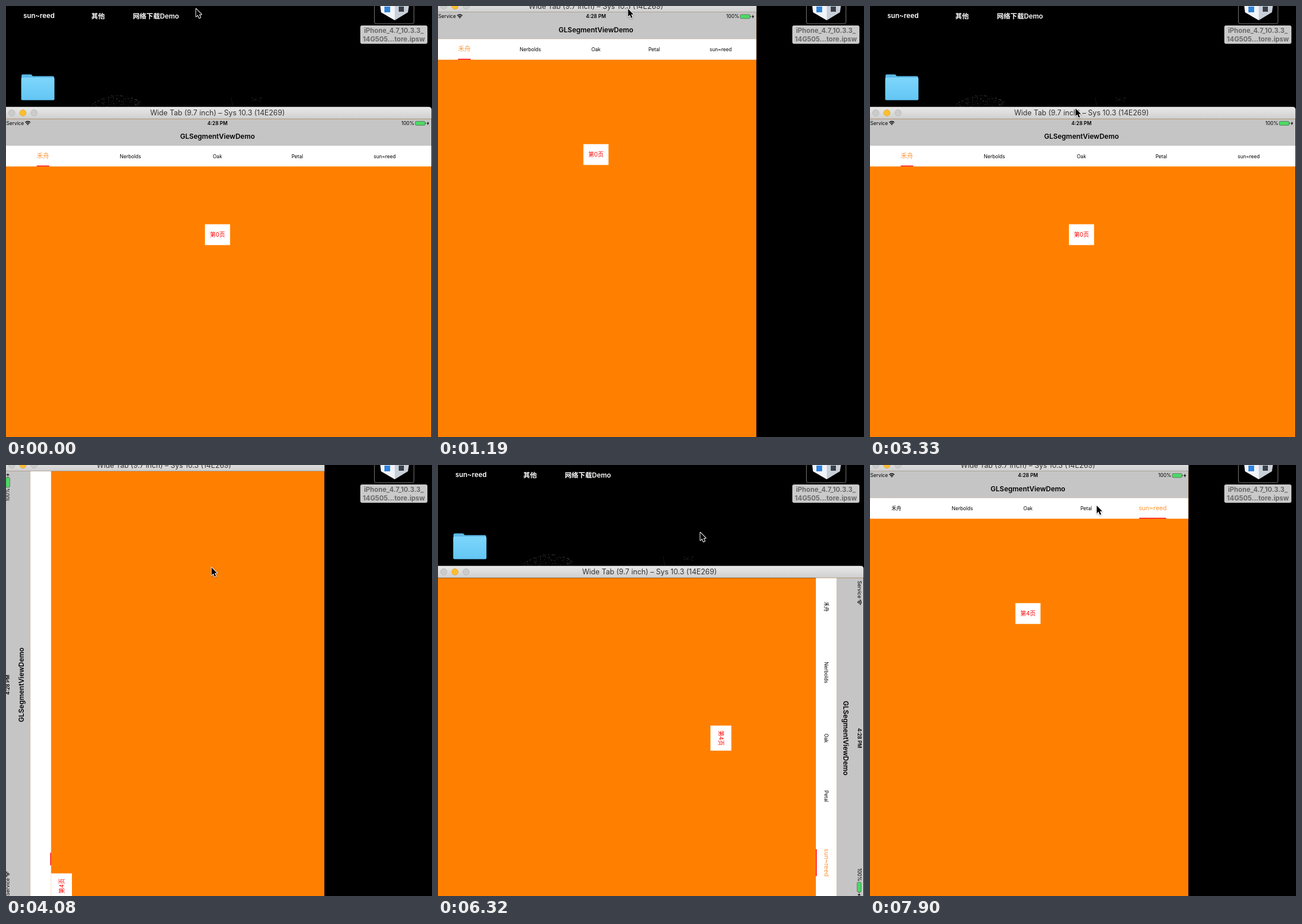
These frames come from a looping animation (743 by 753 pixels, 7990 ms). An HTML page:

```html
<!DOCTYPE html>
<html lang="zh">
<head>
<meta charset="utf-8">
<title>GLSegmentViewDemo</title>
<style>
  html, body { margin: 0; width: 100%; height: 100%; overflow: hidden; background: #000; }
  svg { display: block; }
  text { font-family: Inter, "Noto Sans CJK SC", "Noto Sans CJK", sans-serif; white-space: pre; }
  .mid { text-anchor: middle; }
  .desk { font-size: 11.8px; font-weight: 600; fill: #fff; }
  .file { font-size: 11.6px; font-weight: 700; fill: #6a6a6a; }
  .status { font-size: 8.6px; }
  .tab { font-size: 8.6px; }
  .tab.on { font-size: 10.8px; fill: #ff9430; }
  .page { font-size: 10px; fill: #f00; }
</style>
</head>
<body>
<svg width="743" height="753" viewBox="0 0 743 753">
  <defs>
    <linearGradient id="bar" x2="0" y2="1">
      <stop stop-color="#e9e9e9"/><stop offset="1" stop-color="#cfcfcf"/>
    </linearGradient>
    <linearGradient id="blue" x2="0" y2="1">
      <stop stop-color="#7dd6fb"/><stop offset="1" stop-color="#63c6f5"/>
    </linearGradient>
    <clipPath id="clip"><rect id="clipBox" y="21"/></clipPath>
  </defs>

  <rect width="743" height="753"/>
  <g id="dust" fill="#fff"></g>
  <text class="desk mid" x="57.5" y="20.5">sun~reed</text>
  <text class="desk mid" x="160.5" y="21.5">其他</text>
  <text class="desk mid" x="261.5" y="22">网络下载Demo</text>
  <path fill="#5bb9e6" d="M27 122q0-2.500 2.500-2.500h13.500q1.500 0 2.500 1.500l1 1.500h35q2.500 0 2.500 2.500v8H27z"/>
  <rect x="26.500" y="125" width="58" height="39.500" rx="2" fill="url(#blue)"/>

  <rect x="642.500" y="-20" width="69" height="51" rx="3" fill="#000" stroke="#777"/>
  <path fill="#f1f4f9" d="M652-8L678 0V25L654 11z"/>
  <path fill="#c9cfd9" d="M704-8L678 0V25L701 11z"/>
  <rect x="660" y="1" width="10" height="10" fill="#2f83dd"/>
  <rect id="seal" x="685" y="1" width="9" height="9" fill="#3a3f48"/>
  <rect x="618" y="34" width="117" height="32" rx="3" fill="#cacaca"/>
  <text class="file mid" x="676.500" y="47">iPhone_4.7_10.3.3_</text>
  <text class="file mid" x="676.500" y="62">14G505...tore.ipsw</text>

  <g id="win">
    <path id="titleBar" fill="url(#bar)"/>
    <g fill="#cbcbcb" stroke="#b4b4b4" stroke-width=".8">
      <circle cx="14.500" cy="10.500" r="5.500"/>
      <circle cx="34" cy="10.500" r="5.500" fill="#fdbe2f" stroke="#dfa023"/>
      <circle cx="53.500" cy="10.500" r="5.500"/>
    </g>
    <text id="winName" class="mid" y="15.200" font-size="12.600" fill="#333">Wide Tab (9.7 inch) – Sys 10.3 (14E269)</text>
    <rect id="edge" y="20.300" height=".700" fill="#b5b5b5"/>
    <g clip-path="url(#clip)">
      <rect id="back" y="21"/>
      <g id="view">
        <rect id="body" fill="#ff8000"/>
        <rect id="tabBar" y="46.700" height="36.400" fill="#fff"/>
        <g id="tabs"></g>
        <rect id="line" y="81.600" height="1.500" fill="#f00"/>
        <g id="page">
          <rect x="-21.900" y="-18.200" width="43.800" height="36.400" fill="#fff"/>
          <text id="pageName" class="page mid" y="3.700"></text>
        </g>
        <rect id="nav" height="47" fill="#c5c5c5"/>
        <text class="status" x="5" y="10.700">Service</text>
        <g fill="none" stroke="#000" stroke-width="1.300">
          <path d="M38 6.300q4.500-4 9 0M39.800 8.300q2.700-2.400 5.400 0"/>
          <path fill="#000" stroke="none" d="M40.900 9.400q1.600-1.200 3.200 0L42.500 11z"/>
        </g>
        <g id="center" class="mid">
          <text class="status" y="10.700" font-weight="600">4:28 PM</text>
          <text y="35.200" font-size="12" font-weight="600">GLSegmentViewDemo</text>
        </g>
        <g id="right">
          <text class="status" x="-30" y="10.700" text-anchor="end">100%</text>
          <rect x="-28.300" y="4.200" width="17" height="7" rx="1.500" fill="#4cd964" stroke="#555" stroke-width=".7"/>
          <rect x="-10.800" y="6.400" width="1.200" height="2.600" fill="#555"/>
          <path d="M-5.500 4.200L-8.500 8.200H-6.600L-7.400 11.200L-4 7.200H-6z"/>
        </g>
      </g>
    </g>
  </g>
  <path id="cursor" stroke="#fff" stroke-width="2" paint-order="stroke" stroke-linejoin="round"
    style="filter:drop-shadow(0 1px 1px rgba(0,0,0,.35))"
    d="M.500 1V14.500L3.600 11.600L6 17L8.200 16L5.900 10.700H10z"/>
</svg>
<script>
const LOOP = 7990, TURN = 400, SWITCH = 5350;
const $ = id => document.getElementById(id);
const set = (el, attrs) => { for (const k in attrs) el.setAttribute(k, attrs[k]); };
const clamp = v => Math.min(1, Math.max(0, v));
const mix = (a, b, p) => a + (b - a) * p;
const ease = p => p * p * (3 - 2 * p);

const wide = { x: -4.5, y: 176.2, w: 746.7, h: 560, tabs: [69, 221.5, 373.3, 512.5, 665], pageY: 202.3 };
const tall = { x: -4.5, y: -10.3, w: 560, h: 746.7, tabs: [50.5, 165.5, 280, 381.5, 497.5], pageY: 248.8 };
const names = ['禾舟', 'Nerbolds', 'Oak', 'Petal', 'sun~reed'];
const lineWidth = { 0: 22, 4: 47 };

const ticks = [0, 780, 930, 1080, 1190, 1910, 2000, 2100, 2190, 2290, 2380, 2920, 3030, 3210, 3330,
  4080, 4220, 4370, 4520, 4670, 4760, 4860, 4950, 5050, 5350, 5420, 5500, 5570, 5650, 5720,
  6320, 6370, 6550, 6670, 6790, 7240, 7390, 7540, 7660, 7780, 7900];

// Window change, start of the content's turn, old and new layout.
const turns = [
  [780, 780, wide, tall], [2920, 2920, tall, wide], [4080, 4080, wide, tall],
  [6320, 6370, tall, wide], [7240, 7240, wide, tall]
];

// Start, end, then start point, control point and end point.
const moves = [
  [1830, 2380, 331, 4, 228, 125, 358, 178],
  [4370, 4520, 358, 178, 390, 172, 422, 156],
  [4580, 5050, 422, 156, 450, 110, 481, 76],
  [5450, 5720, 481, 76, 480, 100, 457, 117],
  [7480, 7900, 457, 117, 430, 90, 395, 70]
];

const svgEl = (tag, parent, attrs) => {
  const el = document.createElementNS('http://www.w3.org/2000/svg', tag);
  set(el, attrs);
  return parent.appendChild(el);
};

const tabs = names.map(name => {
  const el = svgEl('text', $('tabs'), { y: 3.2 });
  el.textContent = name;
  return el;
});

let seed = 7;
const rand = () => (seed = seed * 16807 % 2147483647) / 2147483647;
const speck = (x, y) => svgEl('rect', $('dust'), { x, y, width: 1, height: 1, opacity: 0.1 + rand() * 0.2 });
for (let i = 0; i < 130; i++) {
  const x = Math.floor(150 + rand() * 86);
  const top = 156 + (x - 195) ** 2 / 130;
  speck(x, Math.floor(top + rand() ** 2 * (176 - top)));
}
for (let i = 0; i < 8; i++) speck(393 + (i >> 2), 160 + i * 2);
for (let i = 0; i < 14; i++) speck(428 + Math.floor(rand() * 20), 160 + Math.floor(rand() * 7));

function drawCursor(t) {
  const [a, b, x0, y0, cx, cy, x1, y1] = moves.filter(m => t >= m[0]).pop() || moves[0];
  const p = ease(clamp((t - a) / (b - a)));
  const bend = (u, v, w) => mix(mix(u, v, p), mix(v, w, p), p);
  set($('cursor'), { transform: `translate(${bend(x0, cx, x1)} ${bend(y0, cy, y1)})` });
}

function drawWindow(box) {
  const { x, y, w, h } = box;
  set($('win'), { transform: `translate(${x} ${y})` });
  set($('titleBar'), { d: `M0 21V5Q0 0 5 0H${w - 5}Q${w} 0 ${w} 5V21z` });
  set($('winName'), { x: w / 2 });
  set($('edge'), { width: w });
  for (const id of ['clipBox', 'back']) set($(id), { width: w, height: h });
}

function drawView(from, to, raw, page, t) {
  const p = ease(clamp(raw));
  const turning = raw >= 0 && raw < 1;
  const at = raw < 0 ? from : to;
  const grow = turning ? p : 1;
  const w = mix(from.w, to.w, p), h = mix(from.h, to.h, p);
  const angle = (to === wide ? 90 : -90) * (1 - p);
  set($('view'), {
    transform: `translate(${to.w / 2} ${21 + to.h / 2}) rotate(${angle}) translate(${-w / 2} ${-h / 2})`
  });
  set($('body'), { width: w, height: h });
  for (const id of ['nav', 'tabBar']) set($(id), { width: w });
  set($('center'), { transform: `translate(${w / 2} 0)` });
  set($('right'), { transform: `translate(${w} 0)` });

  tabs.forEach((el, i) => set(el, {
    class: i === page ? 'tab mid on' : 'tab mid',
    visibility: grow > 0 ? 'visible' : 'hidden',
    transform: `translate(${at.tabs[i] * grow} ${mix(46.7, 65.2, grow)}) scale(${grow})`
  }));

  const slide = page ? ease(clamp((t - SWITCH) / 300)) : 0;
  const spot = i => mix(from.tabs[i], to.tabs[i], p);
  const lineW = mix(lineWidth[0], lineWidth[4], slide);
  set($('line'), { x: mix(spot(0), spot(4), slide) - lineW / 2, width: lineW });

  const start = 22 + page * (to.w - from.w);
  set($('page'), {
    transform: `translate(${mix(start, at.w / 2, grow)} ${mix(101.3, at.pageY, grow)})`
  });
  $('pageName').textContent = `第${turning ? 4 : page}页`;
}

function draw(now) {
  const time = now % LOOP;
  const t = ticks.filter(k => k <= time).pop();
  const turn = turns.filter(k => t >= k[0]).pop();
  const [, begin, from, to] = turn || [0, -TURN, wide, wide];
  drawWindow(to);
  drawView(from, to, (t - begin) / TURN, t >= SWITCH ? 4 : 0, t);
  drawCursor(t);
}

const origin = performance.now();
function frame() {
  draw(performance.now() - origin);
  requestAnimationFrame(frame);
}
frame();
</script>
</body>
</html>
```
